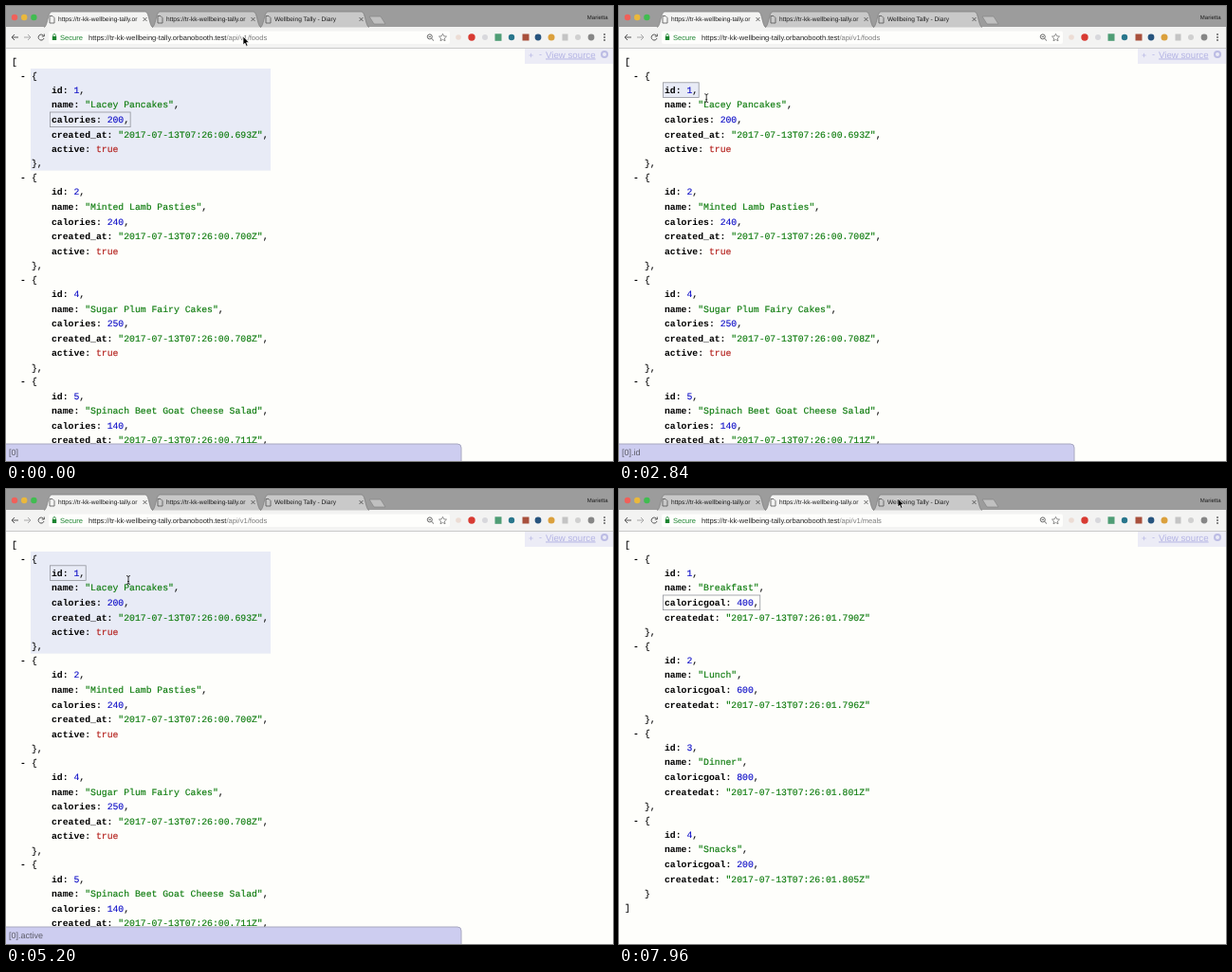
An HTML page for the animation above (8000 ms loop, 640 px wide and 480 px high).

```html
<!DOCTYPE html>
<html lang="en">
<head>
<meta charset="utf-8">
<title>API responses</title>
<style>
html, body { margin: 0; width: 100%; height: 100%; overflow: hidden; background: #fefefb; }
svg { display: block; width: 100vw; height: 100vh; }
text { white-space: pre; text-rendering: geometricPrecision; }
.ui { font-family: "Liberation Sans", Arial, sans-serif; }
.code { font: 9.78px "Liberation Mono", "Courier New", monospace; fill: #111; stroke: #111; stroke-width: 0.15; }
.key { font-weight: bold; fill: #000; stroke: none; }
.num { fill: #1010c8; stroke: #1010c8; }
.str { fill: #0b7a0b; stroke: #0b7a0b; }
.bool { fill: #b4201c; stroke: #b4201c; }
</style>
</head>
<body>
<svg id="stage" viewBox="0 0 640 480" xmlns="http://www.w3.org/2000/svg"></svg>
<script>
const LOOP = 8000;
const CHAR = 5.868;
const LIST_TOP = 66;
const BRACKET = 14.8;
const ROW = 15.6;
const HOST = "https://tr-kk-wellbeing-tally.orbanobooth.test";
const svg = document.getElementById("stage");

function add(parent, tag, attrs = {}, content) {
  const el = document.createElementNS("http://www.w3.org/2000/svg", tag);
  for (const k in attrs) el.setAttribute(k, attrs[k]);
  if (content !== undefined) el.textContent = content;
  parent.appendChild(el);
  return el;
}
const group = (parent, attrs) => add(parent, "g", attrs);
const rect = (p, x, y, width, height, fill, more) => add(p, "rect", { x, y, width, height, fill, ...more });
const circle = (p, cx, cy, r, fill, more) => add(p, "circle", { cx, cy, r, fill, ...more });
const stroke = (p, d, color, width = 1) => add(p, "path", { d, fill: "none", stroke: color, "stroke-width": width });
const label = (p, x, y, size, fill, s, more) =>
  add(p, "text", { class: "ui", x, y, "font-size": size, fill, ...more }, s);
const show = (el, on) => el.setAttribute("visibility", on ? "visible" : "hidden");
const place = (el, box) => { for (const k in box) el.setAttribute(k, box[k]); };

// JSON pages: bracket lines are slightly lower than key lines
function codeLine(page, top, height, x, parts) {
  const text = add(page, "text", { class: "code", x, y: top + height / 2 + 3.2 });
  for (const [cls, s] of parts) add(text, "tspan", { class: cls }, s);
}

function drawPage(page, items, closed) {
  let y = LIST_TOP;
  const bracket = (top, x, s, cls = "") => codeLine(page, top, BRACKET, x, [[cls, s]]);
  bracket(y - BRACKET, 6, "[");
  items.forEach((item, i) => {
    bracket(y, 15, "-", "key");
    bracket(y, 27, "{");
    y += BRACKET;
    const entries = Object.entries(item);
    entries.forEach(([key, value], j) => {
      const cls = { number: "num", string: "str", boolean: "bool" }[typeof value];
      const comma = j < entries.length - 1 ? "," : "";
      codeLine(page, y, ROW, 48, [["key", key + ":"], ["", " "], [cls, JSON.stringify(value)], ["", comma]]);
      y += ROW;
    });
    bracket(y, 27, closed && i === items.length - 1 ? "}" : "},");
    y += BRACKET;
  });
  if (closed) bracket(y, 6, "]");
}

const stamp = s => `2017-07-13T07:26:0${s}Z`;
const food = (id, name, calories, s) => ({ id, name, calories, created_at: stamp(s), active: true });
const meal = (id, name, caloricgoal, s) => ({ id, name, caloricgoal, createdat: stamp(s) });

const block = { x: 26, y: LIST_TOP, width: 253, height: 2 * BRACKET + 5 * ROW };
const field = (index, chars) => ({
  x: 46.5, y: LIST_TOP + BRACKET + index * ROW, width: chars * CHAR + 2.5, height: ROW
});
const rows = {
  id: field(0, 6), name: field(1, 23), calories: field(2, 14), created_at: field(3, 39), active: field(4, 12)
};

rect(svg, 0, 0, 640, 480, "#fefefb");
const foods = group(svg);
const meals = group(svg);
const outline = { stroke: "#92949c", "stroke-width": 0.8 };
const hoverBox = rect(foods, 0, 0, 0, 0, "#e8ebf6");
const focusBox = rect(foods, 0, 0, 0, 0, "none", outline);
place(rect(meals, 0, 0, 0, 0, "none", outline), field(2, 17));

drawPage(foods, [
  food(1, "Lacey Pancakes", 200, "0.693"),
  food(2, "Minted Lamb Pasties", 240, "0.700"),
  food(4, "Sugar Plum Fairy Cakes", 250, "0.708"),
  food(5, "Spinach Beet Goat Cheese Salad", 140, "0.711")
]);
drawPage(meals, [
  meal(1, "Breakfast", 400, "1.790"),
  meal(2, "Lunch", 600, "1.796"),
  meal(3, "Dinner", 800, "1.801"),
  meal(4, "Snacks", 200, "1.805")
], true);

// Viewer controls
rect(svg, 547, 45, 93, 16, "#ececf6");
label(svg, 551, 55, 9, "#b4b4e4", "+");
label(svg, 562, 54, 9, "#b4b4e4", "-");
label(svg, 569, 54.5, 9.7, "#b4b4e4", "View source", { "text-decoration": "underline" });
circle(svg, 631, 51, 3, "none", { stroke: "#bcbce4", "stroke-width": 2 });

// Browser frame
rect(svg, 0, 0, 640, 23, "#9c9c9c");
rect(svg, 0, 22, 640, 23, "#f3f3f2");
stroke(svg, "M0 44.5H640", "#cacaca");
["#f0605a", "#eab83c", "#40bc50"].forEach((c, i) => circle(svg, 9 + i * 10.2, 12, 3.2, c));
label(svg, 634.5, 14, 6, "#1c1c1c", "Marietta", { "text-anchor": "end" });

function drawTab(x, w, title) {
  const g = group(svg);
  const body = add(g, "path", {
    d: `M${x} 22.5C${x + 4} 22 ${x + 4} 6 ${x + 8} 6H${x + w - 8}C${x + w - 4} 6 ${x + w - 4} 22 ${x + w} 22.5`,
    stroke: "#808080", "stroke-width": 0.8
  });
  stroke(g, `M${x + 6} 10.5h3l2 2v5.5h-5z`, "#555", 0.8);
  label(g, x + 15, 16.3, 6.6, "#1c1c1c", title);
  stroke(g, `M${x + 104.5} 12l4 4m0-4l-4 4`, "#444", 0.8);
  return body;
}
const shortUrl = HOST.slice(0, 32);
add(svg, "path", { d: "M383 11H395L400 19H388Z", fill: "#c0c0c0", stroke: "#848484", "stroke-width": 0.7 });
const tabs = [
  drawTab(40, 115, shortUrl),
  drawTab(154, 115, shortUrl),
  drawTab(268, 115, "Wellbeing Tally - Diary")
];

stroke(svg, "M13 33H6M9 30L6 33L9 36", "#555");
stroke(svg, "M19 33H26M23 30L26 33L23 36", "#a8a8a8");
stroke(svg, "M39.7 31.5A3 3 0 1 0 40 34M40.3 29.5V32H37.8", "#555");
rect(svg, 45, 26.5, 423, 13.5, "#fefefc", { rx: 2 });
rect(svg, 48.8, 32, 4.4, 4, "#1c8430");
stroke(svg, "M49.7 32V30.8a1.3 1.3 0 0 1 2.6 0V32", "#1c8430", 0.8);
label(svg, 57, 35.8, 7.56, "#1c8430", "Secure");
const url = label(svg, 87, 35.8, 7.56, "#222", "");
add(url, "tspan", {}, HOST);
const path = add(url, "tspan", { fill: "#7c7c7c" }, "");

circle(svg, 446.8, 32.4, 2.5, "none", { stroke: "#666" });
stroke(svg, "M448.7 34.3L451 36.6M445.6 32.4h2.4", "#666");
stroke(svg, "M460.5 29.3l1.2 2.5 2.8.3-2.1 1.9.6 2.8-2.5-1.4-2.5 1.4.6-2.8-2.1-1.9 2.8-.3z", "#777", 0.8);
circle(svg, 477, 33, 2.8, "#ecdcd4");
circle(svg, 491, 33, 3.7, "#d83a32");
circle(svg, 505, 33, 3, "#d8d8dc");
rect(svg, 515.5, 29.3, 7, 7.5, "#4f9d75");
circle(svg, 533, 33, 3.2, "#28768c");
rect(svg, 544.5, 29.5, 7, 7, "#a8503c");
circle(svg, 561, 33, 3.4, "#27547e");
circle(svg, 575, 33, 3.5, "#dba03c");
rect(svg, 586.5, 29.5, 6, 7, "#c4c4c4");
circle(svg, 603, 33, 3, "#d0d0d0");
circle(svg, 617, 33, 3.4, "#868686");
[30, 33, 36].forEach(y => circle(svg, 631, y, 0.9, "#555"));

// Status bubble
const status = group(svg);
add(status, "path", { d: "M-1 481V462H476Q480 462 480 466V481Z", fill: "#cdcdf0", stroke: "#a8a8c0" });
const statusText = label(status, 3, 474.3, 9, "#5a5a66", "");

// Pointers
const arrow = group(svg);
add(arrow, "path", {
  d: "M0 0V9L2 7.2L3.4 10.4L5 9.7L3.6 6.6H6.3Z", fill: "#000", stroke: "#fff", "stroke-width": 0.7
});
const beam = group(svg);
stroke(beam, "M-2 -4.5Q0 -4.5 0 -3Q0 -4.5 2 -4.5M0 -3V3M-2 4.5Q0 4.5 0 3Q0 4.5 2 4.5M-1 1.5H1", "#222", 0.9);

// Timeline
const track = [
  [0, 250, 32], [280, 247, 34], [980, 76, 88], [1160, 73, 90], [1500, 75, 90],
  [2000, 84, 91], [2700, 86, 92], [3200, 118, 119], [3640, 121, 121], [4200, 123, 122],
  [4650, 118, 149], [4980, 124, 147], [5200, 129, 96], [5600, 186, 18], [5840, 189, 14],
  [7400, 191, 14], [7820, 291, 10.5], [7960, 294, 10], [LOOP, 294, 10]
];
const hovers = [
  [0, "block"], [1220, "id"], [2860, "name"], [3040, "calories"], [4300, "created_at"],
  [4480, "active"], [5070, "block"], [5440, ""]
];
const statuses = [
  [0, "[0]"], [1300, "[0].id"], [2940, "[0].name"], [3120, "[0].calories"],
  [4380, "[0].created_at"], [4560, "[0].active"], [5260, "[0]"], [5640, ""]
];

const latest = (list, t) => list.filter(k => k[0] <= t).pop()[1];

function pointerAt(t) {
  const i = track.findIndex(k => k[0] > t);
  const [t0, x0, y0] = track[i - 1];
  const [t1, x1, y1] = track[i];
  const u = (t - t0) / (t1 - t0);
  const e = u * u * (3 - 2 * u);
  return [x0 + (x1 - x0) * e, y0 + (y1 - y0) * e];
}

function draw(t) {
  const onMeals = t >= 6000;
  show(foods, !onMeals);
  show(meals, onMeals);
  tabs.forEach((tab, i) => tab.setAttribute("fill", i === +onMeals ? "#f3f3f2" : "#c9c9c9"));
  path.textContent = "/api/v1/" + (onMeals ? "meals" : "foods");

  const hover = latest(hovers, t);
  show(hoverBox, hover && !onMeals);
  if (hover) place(hoverBox, hover === "block" ? block : rows[hover]);
  place(focusBox, t < 1500 ? rows.calories : rows.id);

  const message = latest(statuses, t);
  show(status, message);
  statusText.textContent = message;

  const overText = t >= 2750 && t < 5420;
  const [x, y] = pointerAt(t);
  show(arrow, !overText);
  show(beam, overText);
  (overText ? beam : arrow).setAttribute("transform", `translate(${x} ${y})`);
}

const start = performance.now();
function tick(now) {
  draw(Math.max(0, now - start) % LOOP);
  requestAnimationFrame(tick);
}
draw(0);
requestAnimationFrame(tick);
</script>
</body>
</html>
```
